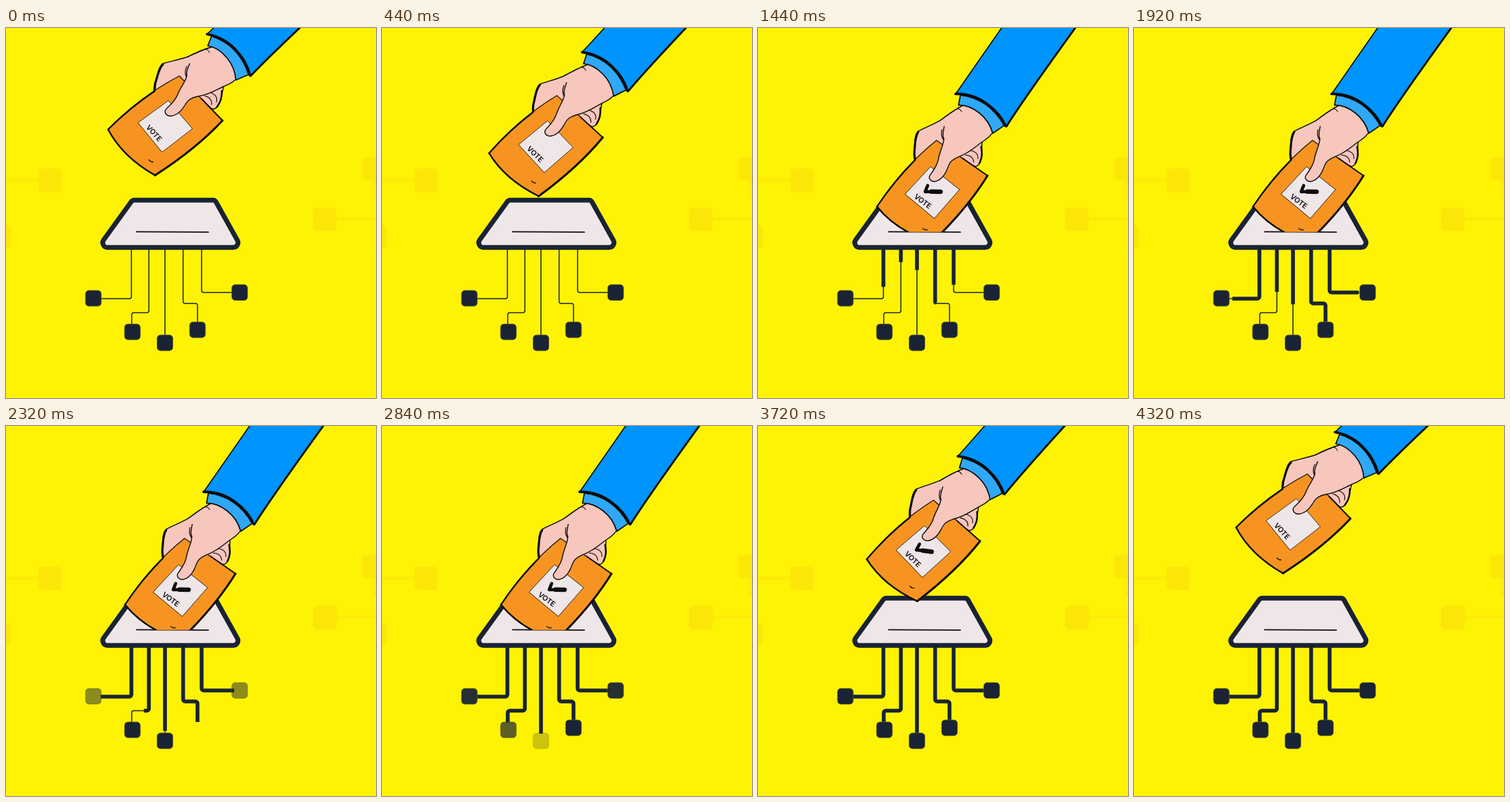
Write an HTML page with a canvas that moves like this. It is 540 px wide and 540 px high and loops after 4.36 s.

```html
<!DOCTYPE html>
<html lang="en">
<head>
<meta charset="utf-8">
<title>Digital vote</title>
<style>
html, body { margin: 0; width: 100%; height: 100%; overflow: hidden; background: #fef304; }
canvas { display: block; width: 540px; height: 540px; }
</style>
</head>
<body>
<canvas id="stage" width="540" height="540"></canvas>
<script>
const ctx = document.getElementById('stage').getContext('2d');
const LOOP = 4360, STEP = 40;
const NAVY = '#1a2333', INK = '#0c0b0d', SKIN = '#f7c6bc', PAPER = '#efe6e8';

// pts: wire route, box: centre of its node, from/to: fill time, flash: node blink start
const wires = [
  { pts: [[183, 320], [183, 395], [138, 395]], box: [127.5, 394.5], from: 1160, to: 2160, ease: 2, flash: 2140 },
  { pts: [[208.5, 320], [208.5, 415.5], [183.5, 415.5], [183.5, 433]], box: [184.5, 443.5], from: 1200, to: 2725, ease: 1, flash: 2735 },
  { pts: [[232, 320], [232, 449]], box: [232, 459.5], from: 1120, to: 2360, ease: 1, flash: 2400 },
  { pts: [[258.5, 320], [258.5, 402], [279.5, 402], [279.5, 432]], box: [279.5, 440.5], from: 1120, to: 1960, ease: 2, flash: 1960 },
  { pts: [[285.5, 320], [285.5, 386], [333, 386]], box: [341, 386], from: 1160, to: 2160, ease: 2, flash: 2140 }
];
const FLASH = 720;

const mix = (a, b, k) => a + (b - a) * k;
const part = (t, a, b) => Math.min(1, Math.max(0, (t - a) / (b - a)));

// cubic-bezier(.5, 0, .32, 1)
function glide(x) {
  let lo = 0, hi = 1, u = 0.5;
  for (let i = 0; i < 24; i++) {
    u = (lo + hi) / 2;
    const v = 1 - u;
    if (1.5 * u * v * v + 0.96 * u * u * v + u * u * u < x) lo = u; else hi = u;
  }
  return u * u * (3 - 2 * u);
}

function stroke(path, width, color = INK) {
  ctx.lineWidth = width;
  ctx.strokeStyle = color;
  ctx.stroke(path);
}
function fill(path, color) {
  ctx.fillStyle = color;
  ctx.fill(path);
}
function line(d, width, color) { stroke(new Path2D(d), width, color); }
function shape(d, color, width) {
  const p = new Path2D(d);
  fill(p, color);
  if (width) stroke(p, width);
}
function block(x, y, w, h, r, color) {
  const p = new Path2D();
  p.roundRect(x, y, w, h, r);
  fill(p, color);
  return p;
}

function route(pts) {
  const p = new Path2D();
  p.moveTo(...pts[0]);
  for (let i = 1; i < pts.length - 1; i++) p.arcTo(...pts[i], ...pts[i + 1], 3);
  p.lineTo(...pts[pts.length - 1]);
  return p;
}
function span(pts) {
  let sum = 0;
  for (let i = 1; i < pts.length; i++)
    sum += Math.hypot(pts[i][0] - pts[i - 1][0], pts[i][1] - pts[i - 1][1]);
  return sum;
}
for (const w of wires) {
  w.path = route(w.pts);
  w.len = span(w.pts);
}

function drawBackdrop() {
  ctx.fillStyle = '#fef304';
  ctx.fillRect(0, 0, 540, 540);
  line('M0 222H48', 5, '#fdeb07');
  line('M482 279H540M537 222V250', 5, '#fdeb07');
  for (const [x, y] of [[47, 205], [-28, 287], [448, 262], [520, 188]])
    block(x, y, 34.5, 34.5, 6, '#fce608');
}

function drawWires(t) {
  ctx.lineCap = 'butt';
  for (const w of wires) {
    stroke(w.path, 1.5, NAVY);
    const k = 1 - Math.pow(1 - part(t, w.from, w.to), w.ease);
    if (k > 0) {
      ctx.setLineDash(k < 1 ? [w.len * k, w.len * 2] : []);
      stroke(w.path, 5.6, NAVY);
      ctx.setLineDash([]);
    }
    ctx.globalAlpha = Math.abs(1 - 2 * part(t, w.flash, w.flash + FLASH));
    const p = block(w.box[0] - 11.5, w.box[1] - 11.5, 23, 23, 5, NAVY);
    stroke(p, 0.8, '#5d5f24');
    ctx.globalAlpha = 1;
  }
}

function drawBox() {
  const p = new Path2D();
  p.moveTo(245, 251.2);
  p.arcTo(305, 251.2, 343.5, 320.3, 5);
  p.arcTo(343.5, 320.3, 240, 320.3, 7);
  p.arcTo(134.5, 320.3, 184.5, 251.2, 7);
  p.arcTo(184.5, 251.2, 245, 251.2, 5);
  p.closePath();
  fill(p, PAPER);
  stroke(p, 7, NAVY);
  line('M190 297.4L296 297.9', 1.6);
}

function drawFingers() {
  shape('M300 28C290 30 278 36 264 42.5C250 47 238 49 229 52C222 57 221 70 218 82L217 102L260 90L310 60Z', SKIN, 1.4);
  line('M229 53C222 60 221 72 218 80C216 88 217 94 217 99', 3.2);
  shape('M280 88L320 80C316 88 316 93 315 97C314 106 311 111 309 114C306 118 303 119 300 118L282 102Z', SKIN, 1.5);
  line('M298 94C306 97 309 102 307 108M290 99C297 101 301 105 300 112', 1.1);
  line('M315 92C315 103 313 108 308 115', 2.4);
}

function drawCheck(k) {
  if (k <= 0) return;
  const pts = [[227.5, 132.3], [222.2, 140.4], [244.5, 144.6]];
  const a = Math.min(1, k / 0.3), b = Math.max(0, (k - 0.3) / 0.7);
  const p = new Path2D();
  p.moveTo(...pts[0]);
  p.lineTo(mix(pts[0][0], pts[1][0], a), mix(pts[0][1], pts[1][1], a));
  if (b > 0) p.lineTo(mix(pts[1][0], pts[2][0], b), mix(pts[1][1], pts[2][1], b));
  stroke(p, 4.6);
  if (b > 0) {
    const q = new Path2D();
    q.moveTo(231, 142);
    q.lineTo(mix(231, 244.3, b), mix(142, 144.8, b));
    stroke(q, 6.4);
  }
}

function drawCard(check) {
  shape('M149 148Q194 101 253 70L316 135Q278 176 217.5 215Q170 188 149 148Z', '#f79421', 1.2);
  line('M149 148Q170 188 217.5 215', 2.4);
  line('M217.5 215Q278 176 316 135', 3);
  line('M285 103L316 135', 1.8);
  line('M149 148Q180 117 217 92', 2.2);
  line('M208.5 192.5L211.5 195L214.5 195.5', 1.3);
  shape('M193 138L237 106L272 147L228 181Z', PAPER, 0.8);
  drawCheck(check);
  ctx.save();
  ctx.translate(216, 153.5);
  ctx.rotate(48 * Math.PI / 180);
  ctx.font = '600 10.5px Inter, Lato, sans-serif';
  ctx.textAlign = 'center';
  ctx.textBaseline = 'middle';
  ctx.fillStyle = INK;
  ctx.fillText('VOTE', 0, 0.5);
  ctx.restore();
}

function drawThumb() {
  shape('M268 53L300 27L318 20L346 60L336 75C328 82 320 83 312 88C300 95 288 98 276 101C266 104 263 113 256 121C248 129 237 131 233 126C230 121 236 117 241 112C248 104 252 92 258 82C264 74 263 66 264 58Z', SKIN);
  line('M268 52C266 58 262 64 264 70C261 80 255 86 251 96C247 107 239 113 234 118C230 122 233 128 240 128.5C250 128 256 121 261 113C266 104 271 102 279 100C294 98 306 91 314 87C322 83 328 82 334 76', 1.4);
  line('M264 56C261 62 261 66 263 71M300 28C290 30 278 36 264 42.5', 1.3);
  line('M292 31Q296 32 297 36', 1);
}

function drawSleeve() {
  shape('M300 12L294.5 26Q309 28 322 43Q334 57 335.5 76L354 68Q340 25 300 12Z', '#2fa8f8', 1.7);
  shape('M293.5 9L377.5 -72L440 -133L546 -114L483.4 -51.5C400 26 376 50 357 70Q352 50 337 34Q320 14 293.5 9Z', '#0094ff', 1.6);
  line('M293.5 9Q320 14 337 34Q351 49 356 69', 3.8);
  line('M357 70C376 50 400 26 483.4 -51.5L546 -114', 2.8);
}

function drawHand(p, check) {
  ctx.save();
  ctx.beginPath();
  ctx.rect(0, 0, 540, 297.8);
  ctx.clip();
  ctx.translate(mix(232.5, 254.7, p), mix(143.5, 240, p));
  ctx.rotate(-11.2 * p * Math.PI / 180);
  ctx.translate(-232.5, -143.5);
  ctx.lineCap = ctx.lineJoin = 'round';
  drawFingers();
  drawCard(check);
  drawThumb();
  drawSleeve();
  ctx.restore();
}

function draw(t) {
  drawBackdrop();
  drawWires(t);
  drawBox();
  const reach = t < 2200 ? glide(part(t, 80, 1100)) : 1 - glide(part(t, 3320, 4170));
  const check = t < 2200 ? part(t, 1140, 1340) : 1 - part(t, 3800, 4000);
  drawHand(reach, check);
}

const start = performance.now();
function tick() {
  const t = (performance.now() - start) % LOOP;
  draw(Math.floor(t / STEP) * STEP);
  requestAnimationFrame(tick);
}
tick();
</script>
</body>
</html>
```
